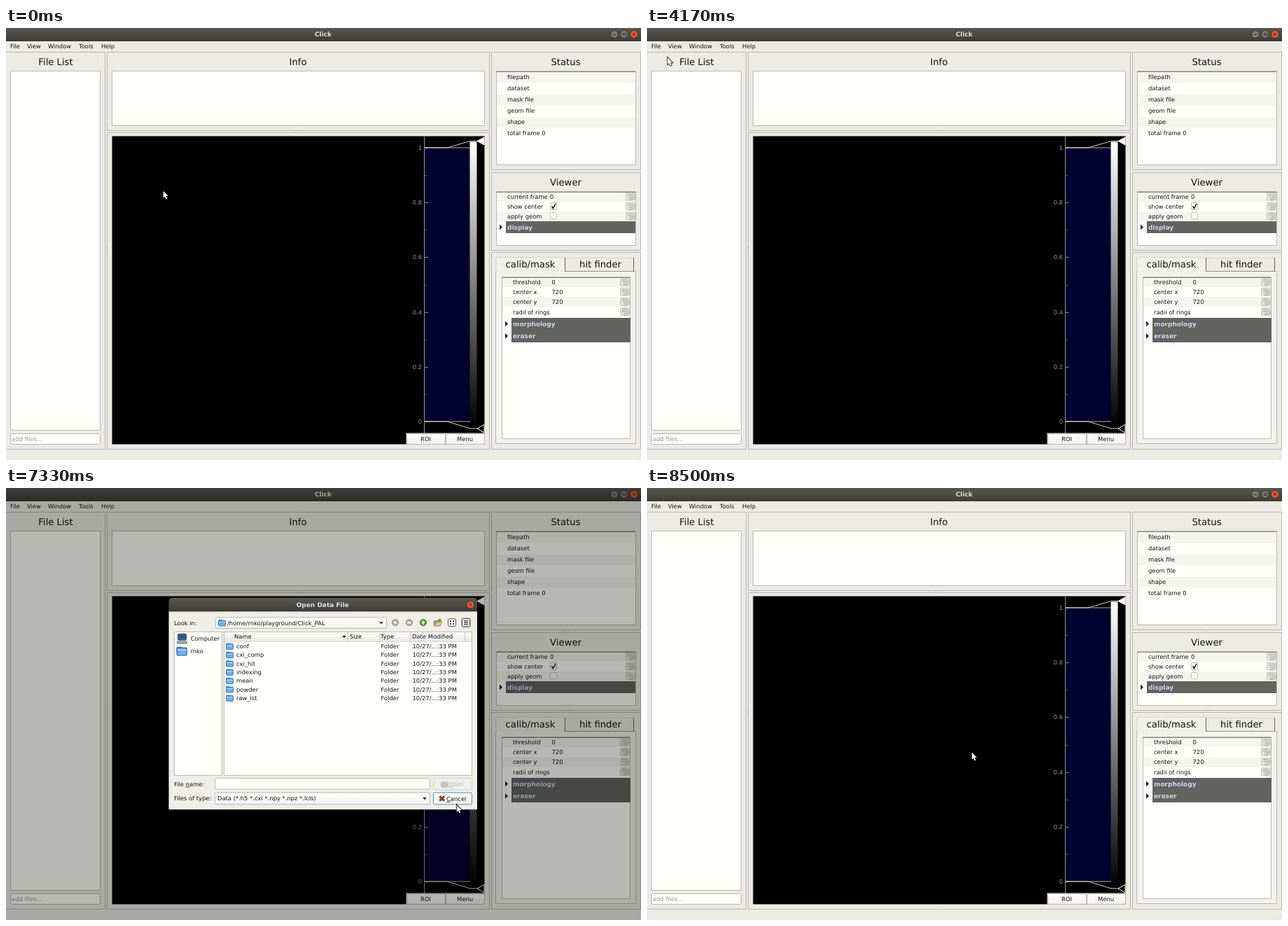
These frames come from a looping animation (907x617 px, 9.66 s). An HTML page with a canvas:

```html
<!DOCTYPE html>
<html>
<head>
<meta charset="utf-8">
<style>
html, body { margin: 0; width: 907px; height: 617px; overflow: hidden; background: #ebebe4; }
canvas { display: block; }
</style>
</head>
<body>
<canvas id="stage" width="907" height="617"></canvas>
<script>
const c = document.getElementById('stage').getContext('2d');
const LOOP = 9660, FPS = 12;
const FACE = '"DejaVu Sans", sans-serif';
const SMALL = '8.4px ' + FACE, HEAD = '13.2px ' + FACE, BOLD = 'bold 9px ' + FACE;
const BG = '#ebebe4', WHITE = '#fffffb', SHADE = '#f5f5f0', EDGE = '#b9b9b2', BLUE = '#308cc6';
const USER = 'rnko';

function text(s, x, y, color = '#111', font = SMALL, align = 'left') {
  c.font = font;
  c.textAlign = align;
  c.fillStyle = color;
  c.fillText(s, x, y);
}
function rect(x, y, w, h, fill) {
  c.fillStyle = fill;
  c.fillRect(x, y, w, h);
}
function box(x0, y0, x1, y1, fill, edge = EDGE, r = 0) {
  c.beginPath();
  c.roundRect(x0 + .5, y0 + .5, x1 - x0 - 1, y1 - y0 - 1, r);
  if (fill) { c.fillStyle = fill; c.fill(); }
  c.strokeStyle = edge;
  c.lineWidth = 1;
  c.stroke();
}
function poly(points, fill, stroke, width = 1) {
  c.beginPath();
  points.forEach(([x, y]) => c.lineTo(x, y));
  if (fill) { c.closePath(); c.fillStyle = fill; c.fill(); }
  if (stroke) { c.strokeStyle = stroke; c.lineWidth = width; c.stroke(); }
}
function disc(x, y, r, fill, edge) {
  c.beginPath();
  c.arc(x, y, r, 0, 7);
  c.fillStyle = fill;
  c.fill();
  if (edge) { c.strokeStyle = edge; c.lineWidth = .8; c.stroke(); }
}
function fade(y0, y1, top, bottom) {
  const g = c.createLinearGradient(0, y0, 0, y1);
  g.addColorStop(0, top);
  g.addColorStop(1, bottom);
  return g;
}
const cross = (x, y, r, color, w) => {
  poly([[x - r, y - r], [x + r, y + r]], null, color, w);
  poly([[x - r, y + r], [x + r, y - r]], null, color, w);
};
const button = (x0, y0, x1, y1, edge = EDGE) =>
  box(x0, y0, x1, y1, fade(y0, y1, '#fffffd', '#f1f1ec'), edge, 2);
const downArrow = (x, y) => poly([[x - 3, y - 1.5], [x + 3, y - 1.5], [x, y + 2]], '#333');

function titleBar(x, y, w, h, title, r) {
  c.beginPath();
  c.roundRect(x, y, w, h, [r, r, 0, 0]);
  c.fillStyle = fade(y, y + h, '#5b5a50', '#3c3b37');
  c.fill();
  text(title, x + w / 2 - .5, y + h / 2 + 3, '#e2ded5', BOLD, 'center');
}
function closeButton(x, y) {
  disc(x, y, 5.5, '#e4572e', '#35342f');
  cross(x, y, 1.8, '#4a2318', 1);
}

function header(x0, x1, y, h, label) {
  rect(x0, y, x1 - x0, h, '#63635f');
  text(label, x0 + 2, y + h / 2 + 3.2, '#ccd2f2', BOLD);
  poly([[x0 - 9, y + h / 2 - 4], [x0 - 5, y + h / 2], [x0 - 9, y + h / 2 + 4]], '#222');
}
function resetIcon(x, y) {
  box(x, y - 6, x + 14, y + 6, '#e2e2dc', '#cbcbc5', 1);
  for (const [color, width] of [['#a2a29d', 3.6], ['#dcdcd7', 1.8]]) {
    c.beginPath();
    c.moveTo(x + 3, y - 2);
    c.lineTo(x + 8, y - 2);
    c.arc(x + 8, y + .8, 2.8, -Math.PI / 2, Math.PI / 2);
    c.lineTo(x + 5, y + 3.6);
    c.strokeStyle = color;
    c.lineWidth = width;
    c.stroke();
  }
}
function params(x0, x1, y0, rows, pitch, valueX) {
  rows.forEach(([name, value], i) => {
    const y = y0 + i * pitch;
    if (i % 2 == 0) rect(x0 + 1, y - 7, x1 - x0 - 2, 14, SHADE);
    text(name, x0 + 16, y + 3);
    text(value, valueX, y + 3);
    resetIcon(x1 - 15, y - .5);
  });
}

function histogram() {
  rect(151.5, 154.5, 532, 440, '#000');
  rect(598, 171, 64.5, 391, '#00002f');
  rect(597, 155, 1, 424, '#969696');
  for (let i = 0; i <= 10; i++) {
    const y = 562 - i * 39.1;
    rect(598, Math.round(y), i % 2 ? 3 : 5, 1, i % 2 ? '#55555f' : '#80808a');
    if (i % 2 == 0) text(String(i / 10), 594, y + 3, '#969696', SMALL, 'right');
  }
  rect(662.5, 162.5, 10, 408.5, fade(163, 571, '#fff', '#000'));
  for (const y of [171, 562]) {
    const tip = y < 300 ? 161.5 : 572;
    rect(598, y - .5, 65, 1, '#b4b4b4');
    poly([[598, y], [630, y], [663, tip], [674, tip]], null, '#d6d6a8');
  }
  poly([[673, 161.5], [683, 156], [683, 167]], '#fff', '#fff');
  poly([[673, 572], [683, 566.5], [683, 578], [673, 572]], '#000', '#fff');
  rect(571.5, 578.5, 112, 16, BG);
  button(572, 579, 628, 595);
  button(628, 579, 684, 595);
  text('ROI', 599.5, 590, '#111', SMALL, 'center');
  text('Menu', 655.5, 590, '#111', SMALL, 'center');
}

function mainWindow() {
  rect(0, 0, 907, 617, BG);
  titleBar(0, -1, 907, 20, 'Click', 0);
  disc(869, 9, 5.3, '#7c7b72', '#33322e');
  disc(883, 9, 5.3, '#7c7b72', '#33322e');
  rect(867, 9, 4, 1, '#33322e');
  box(881, 7, 886, 11, null, '#33322e');
  closeButton(897, 9);
  [['File', 6], ['View', 30], ['Window', 60], ['Tools', 104], ['Help', 136]]
    .forEach(([s, x]) => text(s, x, 29));

  [[-1, 34, 142, 602], [144, 34, 691, 147], [144, 149, 691, 602],
   [693, 34, 907, 203], [693, 206, 907, 318], [693, 320, 907, 602]]
    .forEach(p => box(...p, null));
  for (const [x, y, dx, dy] of [[412, 147, 3, 0], [794, 204, 3, 0], [794, 318, 3, 0], [143, 313, 0, 3]])
    for (let i = 0; i < 4; i++) rect(x + i * dx, y + i * dy, 1, 1, '#c6c6bf');

  [['File List', 71, 53], ['Info', 417, 53], ['Status', 799.5, 53], ['Viewer', 799.5, 225]]
    .forEach(([s, x, y]) => text(s, x, y, '#111', HEAD, 'center'));
  box(6, 61, 135, 575, WHITE);
  box(6, 579, 135, 595, WHITE, EDGE, 2);
  text('add files...', 8, 590, '#969692');
  box(151, 61, 684, 140, WHITE);
  histogram();

  box(700, 61, 900, 196, WHITE);
  rect(700, 62, 199, 1, '#85857f');
  ['filepath', 'dataset', 'mask file', 'geom file', 'shape', 'total frame 0'].forEach((s, i) => {
    if (i % 2 == 0) rect(701, 63 + i * 16, 198, 15.5, SHADE);
    text(s, 716, 73.3 + i * 16);
  });

  box(700, 233, 900, 311, WHITE);
  params(700, 900, 241, [['current frame', '0'], ['show center', ''], ['apply geom', '']], 14, 777);
  rect(700, 234, 199, 1, '#85857f');
  box(777, 249, 787, 260, WHITE, '#b5b5af', 1);
  box(777, 263, 787, 273, WHITE, '#c3c3bd', 1);
  poly([[779.5, 254.5], [781.5, 257.5], [785, 251]], null, '#111', 1.5);
  header(714, 899, 276, 17, 'display');

  box(699, 347, 900, 594, '#f2f2ed');
  rect(701, 327, 97, 21, '#f0f0ea');
  rect(700, 327, 98, 1, '#d5d5ce');
  rect(699, 328, 1, 20, '#d5d5ce');
  rect(798, 328, 99, 1, '#d5d5ce');
  rect(799, 329, 97, 18, BG);
  rect(798, 328, 1, 19, '#64645f');
  rect(896, 328, 1, 19, '#64645f');
  rect(798, 347, 99, 1, '#92928c');
  text('calib/mask', 749, 342, '#111', HEAD, 'center');
  text('hit finder', 849, 342, '#111', HEAD, 'center');
  box(708, 355, 892, 587, WHITE);
  params(708, 892, 363, [['threshold', '0'], ['center x', '720'], ['center y', '720'], ['radii of rings', '']], 14.2, 779.5);
  rect(708, 356, 183, 1, '#85857f');
  header(722, 892, 414, 17, 'morphology');
  header(722, 892, 431, 18, 'eraser');
  for (let i = 0; i < 3; i++) rect(905 - i * 2, 611 + i * 2, 1, 1, '#c9c9c2');
}

function fileMenu(hover) {
  rect(5, 20, 16, 14, '#4694c6');
  text('File', 6, 29, '#fff');
  box(3, 34, 138, 135, '#dadad4', '#c9c9c3');
  box(4, 34, 137, 134, '#fdfdf9', '#9c9c96');
  if (hover) rect(5, 35, 131, 15, BLUE);
  ['Add File...', 'Load Hit Finding Conf', 'Load Geometry', 'Save Hit Finding Conf', 'Save Mask', 'Settings']
    .forEach((s, i) => text(s, 23, [45, 62, 78, 95.3, 111.5, 129][i], hover && !i ? '#fff' : '#111'));
  for (const y of [50, 83, 117]) rect(8, y, 125, 1, '#c6c6c0');
}

function folder(x, y, k = 1) {
  c.save();
  c.translate(x, y);
  c.scale(k, k);
  box(0, -4.5, 6, 2, '#3d7fc0', '#2f6ca8', 1);
  box(0, -4, 11, 5, fade(-4, 5, '#5aa0dd', '#7ab6ec'), '#3677b4', 1);
  rect(1, -1.5, 9, 1, '#cfe4f8');
  c.restore();
}
function underlined(s, x, y, at, color) {
  text(s, x, y, color);
  const skip = c.measureText(s.slice(0, at)).width;
  rect(x + skip, y + 1, c.measureText(s[at]).width, .8, color);
}
function arrowDisc(x, color, edge, angle) {
  disc(x, 190, 4.7, color, edge);
  c.save();
  c.translate(x, 190);
  c.rotate(angle);
  poly([[-2.8, 0], [0, -2.8], [0, -1], [2.8, -1], [2.8, 1], [0, 1], [0, 2.8]], '#fff');
  c.restore();
}

function dialog(scale, caret, closing) {
  c.save();
  c.translate(0, 308);
  c.scale(1, scale);
  c.translate(0, -308);
  rect(232.5, 172, 440.5, 290, '#efefe8');
  titleBar(232.5, 154, 440.5, 20, 'Open Data File', 5);
  closeButton(663.5, 164);

  text('Look in:', 240, 193.5);
  button(299, 182, 544, 199);
  folder(303, 190.5);
  text(`/home/${USER}/playground/Click_PAL`, 316, 193.5);
  downArrow(536, 190.5);
  arrowDisc(556, '#a9a9a5', '#8b8b87', 0);
  arrowDisc(576, '#a9a9a5', '#8b8b87', Math.PI);
  arrowDisc(596, '#5f9a2c', '#3d6b18', Math.PI / 2);
  box(611, 187, 621, 195, '#c9a77c', '#85643c', 1);
  poly([[612, 195], [615, 189], [623, 189], [620, 195]], '#dfc39c', '#85643c', .7);
  disc(619.5, 186.5, 2.3, '#6ba539');
  box(650, 183, 664, 198, '#e2e2dc', '#b0b0aa', 2);
  for (const x of [631, 651]) box(x, 184, x + 12, 196, '#fff', '#44443f', 2);
  for (let i = 0; i < 4; i++) rect(634 + i % 2 * 4, 187 + (i >> 1) * 4, 2, 2, '#222');
  for (let i = 0; i < 3; i++) rect(654, 187 + i * 2.5, 6, 1.2, '#222');

  box(240, 203, 309, 413, WHITE);
  box(245, 206, 258, 216, '#3a6ea5', '#3b3f45', 1);
  rect(247, 208, 9, 5, '#2a548a');
  box(244, 217, 259, 221, '#b9bcc0', '#55585c', 1);
  text('Computer', 263.5, 216);
  folder(243.5, 231.5, 1.4);
  text(USER, 263.5, 234.5);

  box(311, 203, 666, 413, WHITE);
  rect(312, 204, 353, 13, fade(204, 217, '#fbfbf7', '#ecece6'));
  rect(312, 217, 353, 1, '#c9c9c3');
  for (const x of [488, 533, 577, 655]) rect(x, 204, 1, 13, '#c9c9c3');
  [['Name', 326], ['Size', 491], ['Type', 535], ['Date Modified', 580]]
    .forEach(([s, x]) => text(s, x, 213.7));
  downArrow(483, 210.8);
  ['conf', 'cxi_comp', 'cxi_hit', 'indexing', 'mean', 'powder', 'raw_lst'].forEach((s, i) => {
    const y = 224.5 + i * 12.55;
    folder(314, y);
    text(s, 329, y + 3);
    text('Folder', 535.5, y + 3);
    text('10/27/...:33 PM', 580.5, y + 3);
  });

  underlined('File name:', 240, 428, 5, '#111');
  box(298, 416, 606, 433, WHITE, closing ? EDGE : '#4b93c4', 2);
  if (!closing) box(299, 417, 605, 432, null, '#b7d7ec', 1);
  if (caret) rect(301, 419, 1, 11, '#111');
  box(610, 416, 666, 434, '#eeeee8', '#d2d2cb', 2);
  box(621, 422, 631, 430, '#c9c9c5', '#b9b9b4', 1);
  underlined('Open', 631, 428.5, 0, '#bcbcb7');

  text('Files of type:', 240, 449);
  button(298, 437, 606, 455);
  text('Data (*.h5 *.cxi *.npy *.npz *.lcls)', 302, 449);
  downArrow(598, 446);
  button(610, 437, 666, 455, closing ? '#4b93c4' : EDGE);
  cross(622.7, 446, 3.3, '#5a2017', 2.8);
  cross(622.7, 446, 3, '#b0382a', 1.5);
  underlined('Cancel', 629, 449.5, 0, '#111');
  c.restore();
}

// Pointer moves: first step, last step, destination.
const moves = [
  [14, 17, 105, 151], [19, 20, 84.5, 131], [22, 22, 83, 128], [24, 28, 18, 38], [30, 32, 12.7, 27],
  [43, 45, 27, 40], [48, 48, 28.7, 41], [55, 58, 184, 163], [60, 60, 235, 204], [62, 64, 337, 263],
  [66, 66, 468.5, 329], [67, 68, 501, 343], [70, 70, 523, 364], [72, 74, 645, 438], [75, 75, 630, 437],
  [77, 77, 620, 434], [79, 80, 643, 451.5], [96, 98, 545, 409], [100, 100, 494, 389], [102, 102, 463.3, 376.5]
];
function pointerAt(step) {
  let x = 224, y = 231.5;
  for (const [a, b, tx, ty] of moves) {
    const p = clamp((step - a + 1) / (b - a + 1));
    x += (tx - x) * p;
    y += (ty - y) * p;
  }
  return [x, y];
}
function pointer(x, y) {
  const shape = [[.7, 1.2], [.7, 11.2], [3, 9.2], [4.6, 13], [6.4, 12.2], [4.7, 8.5], [7.8, 8.5]];
  const placed = shape.map(([dx, dy]) => [x + dx, y + dy]);
  poly([...placed, placed[0]], '#fff', '#000', 1.5);
  poly(placed, '#fff');
}

const clamp = v => Math.max(0, Math.min(1, v));
const easeOut = v => 1 - (1 - clamp(v)) ** 2;

function draw(now) {
  const step = Math.floor((now % LOOP + 4) * FPS / 1000);
  const t = step * 1000 / FPS;
  const [x, y] = pointerAt(step);
  c.textRendering = 'geometricPrecision';
  mainWindow();
  if (step >= 36 && step < 50) fileMenu(y > 34);

  const undimTime = step < 96 ? Math.min(t, 7500) : t;
  const dim = .305 * (easeOut((t - 4270) / 500) - easeOut((undimTime - 7325) / 240));
  if (dim > 0) rect(0, 0, 907, 617, `rgba(0,0,0,${dim})`);

  const closing = step >= 88;
  const scale = easeOut((t - 4200) / 100) - clamp((t - 7331.5) / 100);
  if (scale > 0) dialog(scale, !closing && (t + 840) % 1000 < 500, closing);
  pointer(x, y);
}

const start = performance.now();
function tick() {
  draw(performance.now() - start);
  requestAnimationFrame(tick);
}
tick();
</script>
</body>
</html>
```
